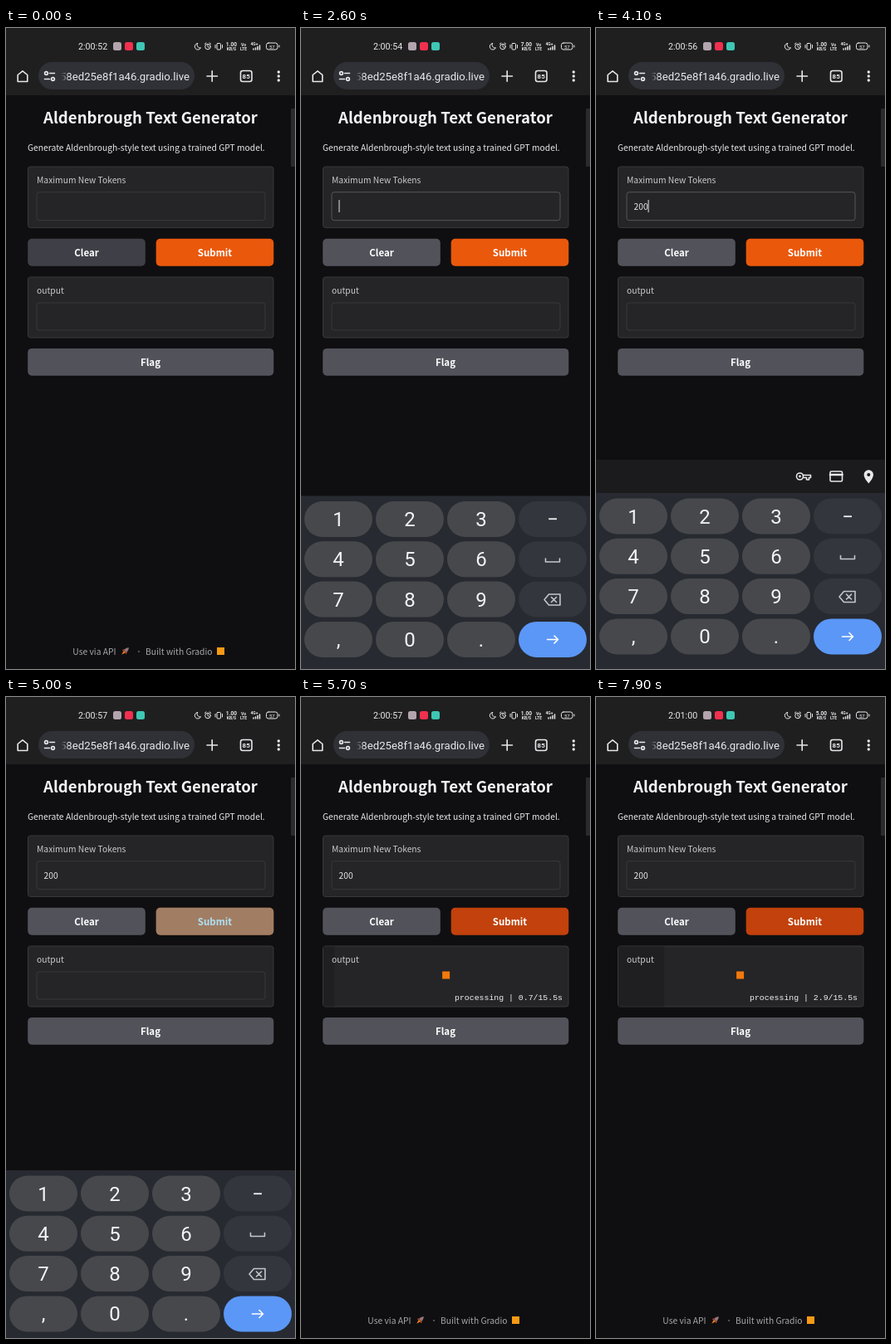
An HTML page for the animation above (8 s loop, 348 by 772 pixels).

```html
<!DOCTYPE html>
<html lang="en">
<head>
<meta charset="utf-8">
<title>Text Generator</title>
<style>
  html, body { margin: 0; width: 100%; height: 100%; overflow: hidden; background: #0f0f11; }
  svg { display: block; width: 100vw; height: 100vh; }
  text { font: 10.3px "Noto Sans CJK SC", "Noto Sans CJK JP", "Noto Sans CJK", "Open Sans", sans-serif; fill: #e8e8ea; }
  .mid { text-anchor: middle; }
  .end { text-anchor: end; }
  .title { font-size: 18.6px; font-weight: 600; fill: #f4f4f5; }
  .btn { font-size: 11.5px; font-weight: 600; fill: #fff; text-anchor: middle; }
  .label { fill: #c9c9ce; }
  .foot { fill: #a6a6ad; }
  .mono { font: 9.85px "Liberation Mono", "DejaVu Sans Mono", monospace; fill: #f4f4f5; }
  .phone { font-family: Roboto, sans-serif; fill: #e8e8ea; }
  .key { font: 24px Roboto, sans-serif; fill: #f3f4f6; text-anchor: middle; }
  .box { fill: #252527; stroke: #39393d; }
  .line { fill: none; stroke: #e8e8ea; stroke-width: 1.6; stroke-linejoin: round; stroke-linecap: round; }
  .thin { stroke-width: 1; }
</style>
</head>
<body>
<svg viewBox="0 0 348 772" preserveAspectRatio="none">
  <defs>
    <linearGradient id="fade">
      <stop offset=".3" stop-color="#303137"/>
      <stop offset="1" stop-color="#303137" stop-opacity="0"/>
    </linearGradient>
  </defs>
  <rect width="348" height="772" fill="#0f0f11"/>
  <rect width="348" height="81" fill="#1f1f20"/>

  <!-- status bar -->
  <text id="clock" class="phone" x="87" y="26" style="font-size:10.7px"></text>
  <rect x="129" y="17" width="10" height="10" rx="2.5" fill="#b3a5ae"/>
  <rect x="143" y="17" width="10" height="10" rx="2.5" fill="#f0304f"/>
  <rect x="157" y="17" width="10" height="10" rx="2.5" fill="#3ec7b4"/>
  <g class="line thin">
    <path d="M230.5 18.5a3.8 3.8 0 1 0 4 5.3a3.6 3.6 0 0 1-4-5.3z"/>
    <circle cx="243" cy="22.5" r="3.3"/>
    <path d="M243 20.5v2.2l1.4 1M239.3 19.3l1.7-1.4M246.7 19.3l-1.7-1.4"/>
    <rect x="254" y="18.5" width="4.5" height="7.5" rx="1"/>
    <path d="M252 20.5v3.5M260.5 20.5v3.5"/>
    <path d="M298 26v-1M300.5 26v-2M303 26v-3.5M305.5 26v-5" stroke-width="1.5"/>
    <rect x="313.5" y="18" width="13.5" height="8" rx="2.5"/>
    <path d="M329 21v2"/>
  </g>
  <g class="mid">
    <text id="speed" class="phone" x="271.5" y="21.5" style="font-size:6.6px;font-weight:600"></text>
    <text class="phone" x="271.5" y="27" style="font-size:5px;font-weight:600">KB/S</text>
    <text class="phone" x="286" y="21.5" style="font-size:5px;font-weight:600">Vo</text>
    <text class="phone" x="286" y="26.5" style="font-size:5px;font-weight:600">LTE</text>
    <text class="phone" x="299" y="21" style="font-size:5px;font-weight:600">4G+</text>
    <text class="phone" x="320.3" y="24.5" style="font-size:6px">57</text>
  </g>

  <!-- browser bar -->
  <path class="line" d="M14.2 56.5L20 51.8l5.8 4.700v8h-11.6z"/>
  <rect x="39" y="41" width="188" height="33" rx="16.5" fill="#303137"/>
  <g class="line" stroke-width="1.4">
    <circle cx="48.5" cy="54.5" r="1.9"/><path d="M52.5 54.5h6"/>
    <circle cx="56.5" cy="61.5" r="1.9"/><path d="M46.5 61.5h6"/>
  </g>
  <text class="phone end" x="221" y="62.5" style="font-size:13.2px">58ed25e8f1a46.gradio.live</text>
  <rect x="63" y="46" width="13" height="22" fill="url(#fade)"/>
  <path class="line" d="M242 58h12.5M248.2 51.8v12.5"/>
  <rect class="line" x="282.5" y="51.5" width="13.5" height="13" rx="2.5"/>
  <text class="phone mid" x="289.2" y="60.800" style="font-size:8px;font-weight:700">85</text>
  <g fill="#e8e8ea"><circle cx="328.3" cy="53" r="1.7"/><circle cx="328.3" cy="58" r="1.7"/><circle cx="328.3" cy="63" r="1.7"/></g>

  <!-- page -->
  <rect x="343" y="97" width="6" height="70" rx="1" fill="#2a2a2c"/>
  <text class="title mid" x="174" y="115">Aldenbrough Text Generator</text>
  <text x="26" y="148">Generate Aldenbrough-style text using a trained GPT model.</text>

  <rect class="box" x="26.5" y="167" width="295.5" height="73.5" rx="3"/>
  <text class="label" x="37" y="187">Maximum New Tokens</text>
  <rect id="field" class="box" x="37" y="197.7" width="275" height="34" rx="3"/>
  <text id="value" x="45.5" y="218.5"></text>
  <rect id="caret" y="207" width="1" height="15" fill="#e4e4e7"/>

  <rect id="clear" x="26.2" y="253.7" width="141.6" height="33" rx="5"/>
  <text class="btn" x="97" y="274.5">Clear</text>
  <rect id="submit" x="180.7" y="253.7" width="141.6" height="33" rx="5"/>
  <text class="btn" x="251.5" y="274.5">Submit</text>
  <rect id="tap" x="180.7" y="253.7" width="141.6" height="33" rx="5" fill="#33b5e5" opacity=".4"/>

  <rect class="box" x="26.5" y="300" width="295.5" height="73" rx="3"/>
  <rect id="eta" x="27" y="300.5" height="72" fill="#1f1f21"/>
  <text class="label" x="37" y="320">output</text>
  <rect id="result" class="box" x="37" y="331" width="275" height="33" rx="3"/>
  <g id="busy">
    <rect id="loader" x="168.5" y="330.5" width="9" height="9" fill="#f27a0c"/>
    <text id="timer" class="mono end" x="315" y="364.5"></text>
  </g>
  <rect x="26.2" y="385.9" width="296.1" height="32.900" rx="5" fill="#52525b"/>
  <text class="btn" x="174" y="406.5">Flag</text>

  <text class="foot" x="80.3" y="754.5">Use via API</text>
  <g transform="translate(144 750) rotate(45) scale(.9)">
    <path d="M0-6q3 3 2 7h-4q-1-4 2-7z" fill="#94767a"/>
    <path d="M-2-1l-2 3.500h2zM2-1l2 3.500h-2z" fill="#d8492f"/>
    <path d="M-1.800 1.500h3.600l-1.800 6z" fill="#f5801f"/>
  </g>
  <circle cx="160" cy="751" r=".8" fill="#a6a6ad"/>
  <text class="foot" x="168" y="754.5">Built with Gradio</text>
  <rect x="254" y="746" width="9" height="9" fill="#f99a14"/>

  <!-- keyboard -->
  <g id="bar">
    <rect y="520" width="348" height="41" fill="#1b1b1d"/>
    <g class="line" stroke-width="1.5">
      <circle cx="245.5" cy="540" r="4"/><path d="M249.5 538.5h9v3h-2v2.5h-3v-2.5h-4"/>
      <rect x="282" y="534" width="14.5" height="12" rx="1.5"/><path d="M282 538h14.5" stroke-width="2.6"/>
    </g>
    <circle cx="245.5" cy="540" r="1.4" fill="#e8e8ea"/>
    <path d="M328.3 548.5q-5.7-6.5-5.7-10.5a5.7 5.7 0 0 1 11.4 0q0 4-5.7 10.5z" fill="#e8e8ea"/>
    <circle cx="328.3" cy="538" r="2" fill="#1b1b1d"/>
  </g>
  <g id="board">
    <rect y="560" width="348" height="230" fill="#272a31"/>
    <g id="keys"></g>
    <g class="line" stroke-width="1.5">
      <path d="M294.5 635.5v4h17v-4" stroke="#c5c7cc"/>
      <path d="M298.5 678.5h13.5v13h-13.5l-5.5-6.5zM301.5 682l6 6M307.5 682l-6 6" stroke="#c5c7cc"/>
      <path d="M296.5 733h13M305 728.5l4.5 4.5l-4.5 4.5" stroke="#fff"/>
    </g>
  </g>
</svg>
<script>
const LOOP = 8000, STEP = 100;
const ui = Object.fromEntries(
  [...document.querySelectorAll('[id]')].map(node => [node.id, node]));
const set = (node, attrs) => {
  for (const name in attrs) node.setAttribute(name, attrs[name]);
};
const show = (node, on) => set(node, { visibility: on ? 'visible' : 'hidden' });
const within = (t, a, b) => t >= a && t < b;

// Last value of a [time, value] table at or before t
const at = (table, t) => table.reduce((v, [time, next]) => t >= time ? next : v, table[0][1]);

const KEYS = ['123−', '456 ', '789 ', ',0. '];
const keyColor = (row, col) => col < 3 ? '#47484b' : row === 3 ? '#5b97f7' : '#33363c';
ui.keys.innerHTML = KEYS.map((chars, row) => [...chars].map((char, col) => {
  const x = 4 + 86 * col, y = 588 + 48.3 * row;
  return `<rect id="key${row}${col}" x="${x}" y="${y - 21.5}" width="82" height="43" rx="21.5" fill="${keyColor(row, col)}"/>` +
    `<text class="key" x="${x + 41}" y="${y + 8.5}">${char}</text>`;
}).join('')).join('');
const keyTwo = document.getElementById('key01');
const keyZero = document.getElementById('key31');

const SPEED = [[0, '1.00'], [1700, '7.00'], [3900, '1.00'], [7700, '5.00']];
const TYPED = [[0, ''], [3700, '2'], [3900, '20'], [4100, '200']];
const SLIDE = [[0, 230], [2600, 3.5], [2700, 0], [5000, 10], [5100, 150], [5200, 230]];
const CARET_X = 45.5, DIGIT_WIDTH = 5.7;
const FOCUS = 2400, BLUR = 5000, PENDING = 5200, ETA = 15.5;

function draw(t) {
  const secs = 52 + Math.floor((t + 200) / 1000);
  const pad = n => String(n).padStart(2, '0');
  ui.clock.textContent = `2:${pad(Math.floor(secs / 60))}:${pad(secs % 60)}`;
  ui.speed.textContent = at(SPEED, t);

  const typed = at(TYPED, t), focused = within(t, FOCUS, BLUR);
  ui.value.textContent = typed;
  set(ui.field, { style: `stroke:${focused ? '#55555c' : '#39393d'}` });
  set(ui.caret, { x: CARET_X + DIGIT_WIDTH * typed.length });
  show(ui.caret, focused && !within(t, 2900, 3400) && t < 4600);

  set(ui.clear, { fill: t < FOCUS ? '#3f3f47' : '#52525b' });
  set(ui.submit, { fill: t < PENDING ? '#ea580c' : '#c2410c' });
  show(ui.tap, within(t, BLUR, PENDING));

  const pending = t >= PENDING, spent = Math.max(0, t - BLUR) / 1000;
  show(ui.result, !pending);
  show(ui.busy, pending);
  show(ui.eta, pending);
  set(ui.eta, { width: 295 * spent / ETA });
  set(ui.loader, { transform: `translate(${2 * Math.sin(spent * Math.PI)} 0)` });
  ui.timer.textContent = `processing | ${spent.toFixed(1)}/${ETA}s`;

  set(ui.board, { transform: `translate(0 ${at(SLIDE, t)})` });
  show(ui.bar, within(t, 2800, BLUR));
  set(keyTwo, { fill: within(t, 3600, 3700) ? '#5c6065' : keyColor(0, 1) });
  set(keyZero, { fill: within(t, 3800, 3900) || within(t, 4000, 4100) ? '#5c6065' : keyColor(3, 1) });
}

const start = performance.now();
function tick() {
  const t = (performance.now() - start) % LOOP;
  draw(Math.floor(t / STEP) * STEP);
  requestAnimationFrame(tick);
}
tick();
</script>
</body>
</html>
```
